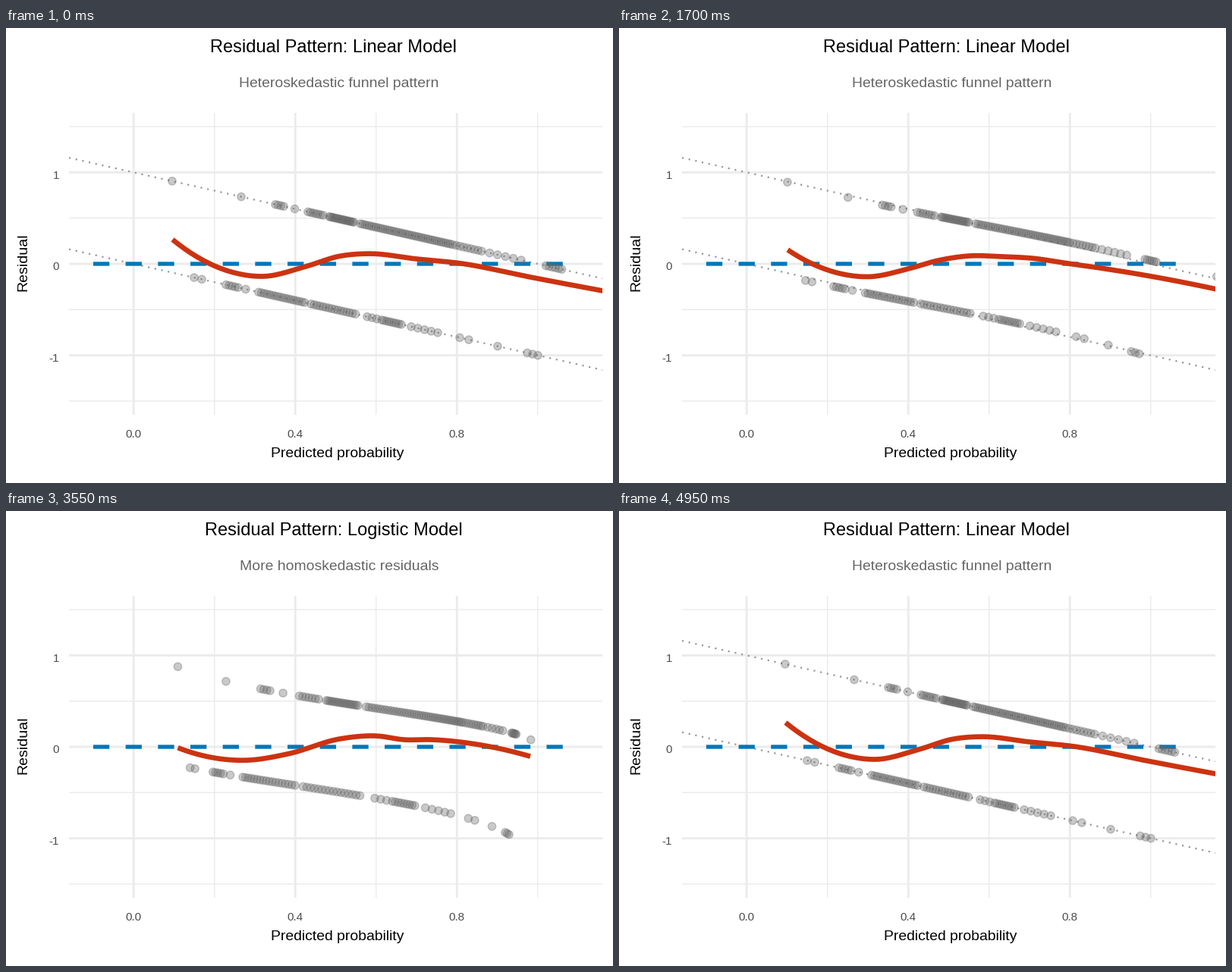
Write a matplotlib script that moves like this. It is 800x600 px and loops after 5 s.

```python
import numpy as np
import matplotlib.pyplot as plt
from matplotlib.animation import FuncAnimation

plt.rcParams["font.family"] = "Liberation Sans"
plt.rcParams["path.snap"] = False

W, H, DPI = 800, 600, 100
LEFT, RIGHT, TOP, BOTTOM = 83, 786, 112, 510
PT = 72 / DPI
UNIT = 150 / 96 * 72.27 / 25.4   # pixels per unit of line size
FRAMES = 100

# Ranked predictions: (rank, screen x), evenly spread between the key ranks
ONES = [(0, 219), (1, 310), (2, 355), (5, 366), (6, 380.5), (7, 398), (13, 418),
        (14, 426), (31, 458.5), (32, 467), (73, 588.5), (81, 627), (86, 679),
        (87, 711.5), (92, 732.5), (93, 853.5)]
ZEROS = [(0, 248), (1, 258), (2, 290), (6, 306), (7, 316), (8, 333), (25, 393.5),
         (26, 402), (41, 460.5), (42, 476), (45, 495), (53, 521), (54, 534),
         (58, 569), (59, 598), (60, 610), (61, 648), (62, 687), (64, 701)]

# Key points of the smoothed trend for each model
LINEAR_TREND = [(219.5, 279), (270, 311.5), (300, 322.5), (338, 327.5), (395, 314.5),
                (440, 300.8), (478, 297.6), (541, 304.5), (600, 310.5), (690, 328.3),
                (853.5, 358.7)]
LOGIT_TREND = [(226.5, 312.2), (270, 324.8), (315, 328.7), (372, 320.2), (440, 300.5),
               (488, 296.6), (525, 301.6), (560, 301.5), (620, 307.6), (691, 323.6)]


def data_x(px):
    return (np.asarray(px, float) - LEFT) / (RIGHT - LEFT) * 1.32 - 0.16


def data_y(py):
    return 1.65 - (np.asarray(py, float) - TOP) / (BOTTOM - TOP) * 3.3


def spread(keys):
    rank, px = np.array(keys, float).T
    return data_x(np.interp(np.arange(rank[-1] + 1), rank, px))


def curve(knots, n=160):
    """Evenly sampled cubic Hermite curve through the knots."""
    kx, ky = np.array(knots, float).T
    slope = np.gradient(ky, kx, edge_order=2)
    x = np.linspace(kx[0], kx[-1], n)
    i = np.clip(np.searchsorted(kx, x) - 1, 0, len(kx) - 2)
    h = kx[i + 1] - kx[i]
    t = (x - kx[i]) / h
    y = ((2 * t**3 - 3 * t**2 + 1) * ky[i] + (t**3 - 2 * t**2 + t) * h * slope[i]
         + (3 * t**2 - 2 * t**3) * ky[i + 1] + (t**3 - t**2) * h * slope[i + 1])
    return np.column_stack([data_x(x), data_y(y)])


def ease(t):
    return 4 * t**3 if t < 0.5 else 1 - 4 * (1 - t)**3


def blend(frame):
    """0 for the linear model, 1 for the logistic model."""
    if frame <= 70:
        return ease(np.clip((frame - 20) / 30, 0, 1))
    return 1 - ease((frame - 70) / 29)


# Linear: raw residuals. Logistic: scaled deviance residuals.
ones, zeros = spread(ONES), spread(ZEROS)
p_lin = np.r_[ones, zeros]
observed = np.r_[np.ones_like(ones), np.zeros_like(zeros)]
p_log = 1 / (1 + np.exp(-5.16 * (p_lin - 0.502)))
likelihood = np.where(observed == 1, p_log, 1 - p_log)
deviance = (2 * observed - 1) * np.sqrt(-2 * np.log(likelihood)) / 2.4
linear = np.column_stack([p_lin, observed - p_lin])
logistic = np.column_stack([p_log, deviance])
trend_lin, trend_log = curve(LINEAR_TREND), curve(LOGIT_TREND)

fig = plt.figure(figsize=(W / DPI, H / DPI), dpi=DPI, facecolor="white")
ax = fig.add_axes([LEFT / W, 1 - BOTTOM / H, (RIGHT - LEFT) / W, (BOTTOM - TOP) / H])
ax.set_xlim(-0.16, 1.16)
ax.set_ylim(-1.65, 1.65)
ax.axis("off")


def line(x, y, color, size, z, **kw):
    return ax.plot(x, y, color=color, lw=size * UNIT * PT, zorder=z,
                   solid_capstyle="butt", dash_capstyle="butt", **kw)[0]


def label(x, y, text, size, color="black", ha="center", **kw):
    return fig.text(x / W, 1 - y / H, text, fontsize=size * PT, color=color,
                    ha=ha, va="baseline", **kw)


def grid(xs, ys, size, z):
    for x in xs:
        line([x, x], [-1.65, 1.65], "#EBEBEB", size, z)
    for y in ys:
        line([-0.16, 1.16], [y, y], "#EBEBEB", size, z)


X_TICKS, Y_TICKS = (0.0, 0.4, 0.8), (-1, 0, 1)
grid((0.2, 0.6, 1.0), (-1.5, -0.5, 0.5, 1.5), 7 / 22, 1)
grid(X_TICKS, Y_TICKS, 14 / 22, 2)
for v in X_TICKS:
    label(168.2 + v * 532.6, 540.3, f"{v:.1f}", 15.3, "#4D4D4D")
for v in Y_TICKS:
    label(70.2, 319.4 - v * 120.6, str(v), 15.3, "#4D4D4D", ha="right")

guides = [line([-0.16, 1.16], [c + 0.16, c - 1.16], "#999999", 0.5, 3,
               linestyle=(0, (1, 3))) for c in (0, 1)]
line([-0.1, 1.1], [0, 0], "#0077BB", 1.2, 4, linestyle=(0, (4, 4)))

GREY = (0.4, 0.4, 0.4, 0.35)
dots = ax.scatter(*linear.T, s=np.full(len(linear), (10.3 * PT)**2), facecolor=GREY,
                  edgecolor=GREY, linewidth=1.45 * PT, zorder=5)
trend = line(*trend_lin.T, "#CC3311", 1.5, 6, solid_joinstyle="round")

title = label(431.6, 32, "", 23.65)
subtitle = label(439.1, 78, "", 19.35, "#666666")
label(437.2, 566, "Predicted probability", 19.35)
label(27.6, 308.5, "Residual", 19.5, rotation=90, rotation_mode="anchor")


def draw(frame):
    k = blend(frame)
    dots.set_offsets(linear + k * (logistic - linear))
    trend.set_data(*(trend_lin + k * (trend_log - trend_lin)).T)
    for g in guides:
        g.set_visible(frame < 50 or frame >= 99)
    if 36 <= frame < 85:
        title.set_text("Residual Pattern: Logistic Model")
        subtitle.set_text("More homoskedastic residuals")
    else:
        title.set_text("Residual Pattern: Linear Model")
        subtitle.set_text("Heteroskedastic funnel pattern")
    return [dots, trend, title, subtitle, *guides]


anim = FuncAnimation(fig, draw, frames=FRAMES, interval=50, repeat=True,
                     repeat_delay=0, blit=False)
plt.show()
```
